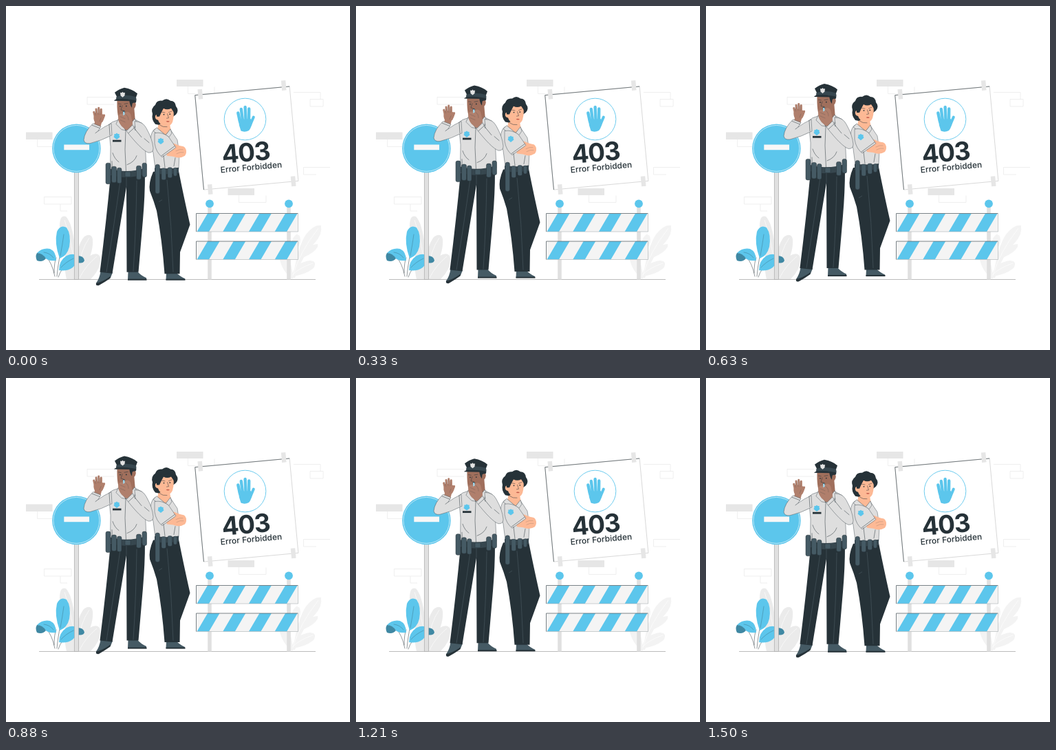
An HTML page that plays this animation: 500x500 px, repeating every 1540 ms.

```html
<!DOCTYPE html>
<html lang="en">
<head>
<meta charset="utf-8">
<title>403 Error Forbidden</title>
<style>
  html, body { margin: 0; width: 100%; height: 100%; overflow: hidden; background: #fff; }
  svg { display: block; width: 100%; height: 100%; }
  .blue { fill: #5cc6ec; }
  .deep { fill: #3f88a3; }
  .dark { fill: #263238; }
  .slate { fill: #37474f; }
  .steel { fill: #455a64; }
  .shirt { fill: #dedede; stroke: #3b474c; stroke-width: .45; }
  .brown { fill: #a06f5c; }
  .tan { fill: #b07f6c; }
  .peach { fill: #fdb995; }
  .grey { fill: #e6e6e6; }
  .leaf { fill: #ebebeb; }
  .pale { fill: #f3f3f3; }
  .line { fill: none; stroke: #263238; stroke-width: .5; stroke-linecap: round; }
  .seam { fill: none; stroke: #53636b; stroke-width: .5; }
  .vein { fill: none; stroke: #fff; stroke-width: .6; }
  .brick { fill: none; stroke: #e9e9e9; stroke-width: .7; }
  .finger { fill: none; stroke-linecap: round; }
  text { text-anchor: middle; fill: #263238; font-family: Inter, sans-serif; }
</style>
</head>
<body>
<svg viewBox="0 0 500 500">
  <defs>
    <clipPath id="board"><rect width="148" height="26.5"/></clipPath>
    <path id="star" d="M0 -4.6 1.6 -3.3 3.7 -3.2 3.6 -.8 4.5 1.1 2.8 2.7 0 4.8 -2.8 2.7 -4.5 1.1 -3.6 -.8 -3.7 -3.2 -1.6 -3.3Z"/>
  </defs>

  <!-- wall -->
  <path class="grey" d="M29 183.5h38.5v10.5H29ZM248 107h38.5v10H248ZM322.5 265H361v10h-38.5Z"/>
  <path class="brick" d="M157 132.5h-39v10.5h39M45.5 194v10.5H67M264.5 117v10.5H303v-10M418 125.5h39v10.5M461 135.5h-19v10.5h19ZM471 234.5h-38.5V245H451M95 277.5H55.5V288H95ZM79 288v10h10M338.5 275v10.5H378V275.5"/>

  <!-- pale plants -->
  <g class="leaf">
    <path d="M100 394Q79 360 78 320Q78 303 87 306Q101 320 103 394Z"/>
    <path d="M102 394Q100 350 114 335Q124 329 126 339Q128 362 106 394Z"/>
    <path d="M105 397Q110 367 126 361Q136 358 137 367Q138 382 123 397Z"/>
    <path d="M88 397Q82 372 93 370Q103 380 104 397Z"/>
  </g>
  <g class="pale">
    <path d="M417 395Q424 350 436 332Q448 317 458 319Q460 332 449 344Q432 360 420 395Z"/>
    <path d="M421 366Q432 348 453 346Q455 350 447 357Q434 367 421 368Z"/>
    <path d="M415 392Q421 372 442 370Q453 371 447 381Q435 391 415 393Z"/>
    <path d="M414 396Q398 380 397 362Q401 352 410 363Q416 377 417 396Z"/>
    <path d="M417 363Q411 340 422 332Q430 332 427 346Z"/>
  </g>
  <path class="vein" d="M417 392Q427 357 454 323M416 391Q427 380 446 374M101 392Q97 345 85 311M103 393Q108 355 121 337M107 395Q116 377 132 364"/>

  <path d="M48 397.5H450" stroke="#b4b4b4" stroke-width=".9"/>

  <!-- blue plant -->
  <path class="line" d="M71 393Q67 373 58 364M74 393Q76 368 83 345M76 394Q80 380 96 369M70 388Q70 372 73 366"/>
  <path class="blue" d="M78 367Q70 345 74 328Q79 317 88 322Q95 332 92 350Q89 363 78 367Z"/>
  <path class="blue" d="M73 370Q73 357 64 353Q53 351 45 359Q52 360 57 366Q60 371 73 370Z"/>
  <path class="deep" d="M45 359Q42 364 45 370Q53 373 58 367Q53 359 45 359Z"/>
  <path class="blue" d="M77 384Q77 370 88 363Q98 358 106 364L106 373Q101 375 97 380Q89 386 77 384Z"/>
  <path class="deep" d="M104 363Q113 363 114 370Q112 375 104 373Z"/>
  <path class="line" d="M79 363Q82 347 84 332M80 380Q87 372 98 367M69 366Q64 359 55 358" stroke-opacity=".5"/>

  <!-- no entry sign -->
  <rect x="99.3" y="240" width="6.2" height="157.5" fill="#e0e0e0" stroke="#a9a9a9" stroke-width=".7"/>
  <circle class="blue" cx="102.4" cy="206.9" r="35.3"/>
  <circle cx="102.4" cy="206.9" r="33.5" fill="none" stroke="#fff" stroke-width=".6"/>
  <rect x="84.3" y="201.5" width="36.7" height="7.7" fill="#f7f7f7"/>

  <!-- poster -->
  <g transform="translate(349.8 192) rotate(-5.3)">
    <rect x="-69" y="-69" width="138" height="138" fill="#fff" stroke="#b4b4b4" stroke-width=".5"/>
    <path d="M-69 69V-69H69" fill="none" stroke="#4a5358" stroke-width=".7"/>
    <path class="grey" d="M-64.5 -77h6.5v14.5h-6.5ZM57.5 -78.5h6.5v14.5h-6.5ZM-63 62h6.5v14.5H-63ZM58.5 61.5H65V76h-6.5Z"/>
  </g>
  <circle cx="347.5" cy="164.5" r="30.3" fill="#fff" stroke="#5cc6ec" stroke-width=".9"/>
  <g stroke="#5cc6ec">
    <path class="finger" stroke-width="4.4" d="M337.3 155.5 340 168M341.8 150 344.2 168M347.6 147 348.6 168M353.2 149.5 353 168"/>
    <path class="finger" stroke-width="4" d="M359.8 161.5 354.5 174"/>
  </g>
  <path class="blue" d="M337.6 165 355.5 164 358 169Q356 178 353 181Q347 184 341.5 181.5Q338.5 174 337.6 165Z"/>
  <text transform="translate(349.4 226) rotate(-5)" font-size="37" font-weight="700" letter-spacing="-1.5">403</text>
  <text transform="translate(356.7 238.5) rotate(-5)" font-size="12" font-weight="500">Error Forbidden</text>

  <!-- barrier -->
  <path d="M293.2 290h5.6v107.5h-5.6ZM408.2 290h5.6v107.5h-5.6Z" fill="#e0e0e0"/>
  <circle class="blue" cx="296" cy="287.3" r="5.9"/>
  <circle class="blue" cx="411" cy="287.3" r="5.9"/>
  <g id="boards"></g>

  <!-- officers -->
  <g id="crew">
    <g id="woman">
      <path class="steel" d="M233 387H247.5Q254 393 260 395.5V397.5H232.5Z"/>
      <path class="dark" d="M232.5 396H260.5V398H232.5Z"/>
      <path class="dark" d="M214 240Q207 256 209 268Q215 283 219 297Q227 340 230.5 388.5H252.5L253 357 267.5 317Q257 270 251 239Z"/>
      <path class="seam" d="M234 252Q241 320 243 386M222 284 227 281"/>
      <path class="peach" d="M221 168Q222 176 218 182L232 189 240 182 238 171Z"/>
      <path class="shirt" d="M219 177Q211 179 210 194Q210 203 214 213L217 236H251L252 214 249 194 239 179 232 187Z"/>
      <path class="dark" d="M217 171Q211 164 213 156Q210 148 217 143Q219 136 227 137Q233 132 239 137Q246 137 247 145Q252 151 247 157L243 160 222 172Z"/>
      <path class="peach" d="M220 154Q222 148 228 148Q237 148 243 147Q245 158 242 168Q239 175 232 174Q223 172 221 165Q216 164 217 159Q218 156 221 158Z"/>
      <path class="dark" d="M219 160Q217 148 224 146Q226 142 231 145Q236 141 241 145Q248 147 245 156Q243 152 240 148Q234 151 229 148Q226 153 223 160Z"/>
      <path class="line" stroke-width=".9" d="M226.5 153.5 231 154.2M236.5 154 241 152.3"/>
      <circle class="dark" cx="229.5" cy="157" r=".9"/>
      <circle class="dark" cx="238.3" cy="156.5" r=".9"/>
      <path class="line" d="M234.5 156 236.5 162 233.5 162.5M223 172Q228 176 234 175"/>
      <path d="M232.5 167Q235 165.5 238 167Q235.5 169 232.5 167Z" fill="#c45a4b"/>
      <path class="shirt" d="M219 176 214 181 227 191 232 187ZM239 178 232 187 237 190 241 184Z"/>
      <path class="peach" d="M244 199Q254 203 260 205Q264 211 260 217Q252 222 243 218L234 217 232 211Z"/>
      <path class="shirt" d="M216 184Q226 182 236 189L247 205 227 219Q218 212 216 199Z"/>
      <path class="peach" d="M246 206Q252 201 259 204Q264 210 260 216Q253 220 246 218Q240 214 246 206Z"/>
      <path class="line" d="M247 210Q252 207 257 208M248 214Q253 211 258 212" stroke-opacity=".35"/>
      <path class="line" d="M229 217 231 234M246 220 244 232M226 217 245 203"/>
      <use class="blue" href="#star" x="225" y="195.5"/>
      <path class="slate" d="M216 234.5Q235 237 251 234V242Q234 245 216 243Z"/>
      <g class="steel" stroke="#263238" stroke-width=".4">
        <rect x="217" y="229.5" width="6.5" height="42.5" rx="3"/>
        <rect x="226" y="235" width="6.5" height="17" rx="2"/>
        <rect x="235" y="234" width="6.5" height="15" rx="2"/>
        <rect x="243.5" y="234.5" width="5" height="12" rx="2"/>
      </g>
    </g>

    <g id="man">
      <path class="steel" d="M137.5 385 155 386.5 152 394Q143 400 135 405Q130 406.5 131 402Q136 395 137.5 385Z"/>
      <path class="dark" d="M131 402Q139 401 152 392L151.5 395Q143 401 135 405.3Q130.5 406.5 131 402Z"/>
      <path class="steel" d="M177.5 385H191Q196 391 204 394.5V397.5H177Z"/>
      <path class="dark" d="M177 396H204.5V398H177Z"/>
      <path class="dark" d="M152 245 202 243Q202 275 199 310L192.5 386H175.5L175 262 154.5 388 136.5 386Q146 310 152 245Z"/>
      <path class="seam" d="M166 254Q156 325 146 386M190 253Q189 325 185 385M175 248 175 262"/>
      <path class="brown" d="M164 158 163 168 174 181 188 168 186 144Z"/>
      <path class="shirt" d="M163 165Q154 167 149 172L152 204 151.5 239Q177 247 204 238L202 190 198 170 187 164 174 180Z"/>

      <!-- raised arm -->
      <path class="tan" d="M128.5 157Q129 152 134 155L142 157 144 158Q142 166 139 169L137 176 127.5 173 129 168Q126 162 128.5 157Z"/>
      <g stroke="#b07f6c">
        <path class="finger" stroke-width="3" d="M127.7 153.5 130 163M131 149.3 132.6 162M134.7 147.5 135.7 162M138.3 149.5 138.5 162"/>
        <path class="finger" stroke-width="2.7" d="M142.8 158 139 167"/>
      </g>
      <path class="line" stroke-opacity=".4" d="M129.5 152 130.5 158M133 149 134 157M136.7 150 137 157M138 162 136 167"/>
      <path class="shirt" d="M126.5 170 138 174.5 134 181Q142 175 153 170L154 187Q139 195 122 199Q114 200 113 194Q114 182 126.5 170Z"/>
      <path class="line" d="M125 172.5 136.5 177M134 181 130 184M150 172 151 187"/>

      <!-- head -->
      <path class="brown" d="M161.5 136H183Q189 137 188.5 143Q188 149 183.5 149Q183 160 178 165Q171 169 165 165Q161 158 161.5 136Z"/>
      <path class="dark" d="M179 135H189Q190 140 187.5 140Q183 140 183 147Q180 144 179 135Z"/>
      <path class="brown" d="M183.5 141Q188.5 138 188.5 143Q188 148.5 183.5 148Z"/>
      <path class="line" stroke-width="1" d="M163.5 141.3 167.3 142M172 141.7 177 140.8"/>
      <circle class="dark" cx="166" cy="145" r=".9"/>
      <circle class="dark" cx="174.8" cy="144.8" r=".9"/>
      <path class="line" d="M169 144 167 150.5 170 151"/>
      <path class="dark" d="M158 125Q164 120 172 118Q184 120 191 126.5L189 132Q190 135 189 137.5Q174 134 160 137L161 131Z"/>
      <path class="slate" d="M160.5 131Q174 127 189 131.5V136.5Q174 133 160 136.5Z"/>
      <path class="dark" d="M157 137Q159 134 165 134.5Q175 133 184 137.5Q170 137 157 137Z"/>
      <path d="M169.5 124 171 125.5 173 125 172.5 129.5 169.5 132 166.5 129.5 166 125 168 125.5Z" fill="#e3e3e3"/>

      <!-- collar and front -->
      <path class="shirt" d="M163 164 160 171 168 179 174 180ZM187 163 191 170 182 179 174 180Z"/>
      <path class="line" d="M174 180 173 208 174.5 240M176 230Q187 226 190 217M155 213Q158 222 164 226M153 238Q155 231 154 225"/>
      <use class="blue" href="#star" x="161" y="188.5"/>
      <rect class="dark" x="155" y="194" width="12.5" height="2.8"/>

      <!-- whistle hand and arm -->
      <path class="tan" d="M163.5 159Q165 155 169 156L176 153Q181 153 182 160L184 169 183 181 174 179 168 174Q162 167 163.5 159Z"/>
      <path class="line" stroke-opacity=".4" d="M166 160 173 163M166 165 173 168M174 157Q178 159 178 165"/>
      <circle class="dark" cx="171.3" cy="153" r="1.6"/>
      <path d="M170 153 172.3 152.5 172.7 157 170.3 158.5Z" fill="#9fd9ee"/>
      <path class="shirt" d="M187 167Q199 167 204 177Q213 193 214 206Q214 213 207 212.5Q197 209 175 181L184 172 188 180Z"/>
      <path class="line" d="M178 184 188 175M188 179 197 190M201 192 208 198"/>

      <!-- duty belt -->
      <path class="slate" d="M148 235Q176 244 204 234V242.5Q177 253 148 244Z"/>
      <g class="steel" stroke="#263238" stroke-width=".5">
        <rect x="145" y="227.5" width="7" height="30.5" rx="2.5"/>
        <rect x="153.5" y="232.5" width="7" height="23.5" rx="2.5"/>
        <rect x="161.5" y="234.5" width="6.5" height="22.5" rx="2.5"/>
        <rect x="189.5" y="231.5" width="7" height="20" rx="2.5"/>
        <rect x="198" y="227.5" width="6.5" height="20.5" rx="2.5"/>
        <rect x="173" y="240" width="8" height="7.5" rx="1"/>
      </g>
    </g>
  </g>
</svg>
<script>
  const stripes = [0, 1, 2, 3].map(i =>
    `<path class="blue" d="M${16.5 + i * 37.7} 0h17.5l-15.5 26.5h-17.5Z"/>`
  ).join('');
  document.getElementById('boards').innerHTML = [301.5, 342].map(y => `
    <g transform="translate(276.5 ${y})">
      <rect width="148" height="26.5" fill="#f4f4f4"/>
      <g clip-path="url(#board)">${stripes}</g>
      <path d="M0 26.5V0H148" fill="none" stroke="#5b666b" stroke-width=".8"/>
      <path d="M0 26.5H148V0" fill="none" stroke="#aab0b3" stroke-width=".6"/>
    </g>`).join('');

  // Both officers rise and sink together on a cosine, highest at PEAK ms.
  const LOOP = 1540, PEAK = 700, RISE = 6, REST = 0.8;
  const crew = document.getElementById('crew');
  const start = performance.now();
  function draw() {
    const phase = (performance.now() - start - PEAK) / LOOP * 2 * Math.PI;
    const y = REST - RISE / 2 * (1 + Math.cos(phase));
    crew.setAttribute('transform', `translate(0 ${y.toFixed(3)})`);
    requestAnimationFrame(draw);
  }
  draw();
</script>
</body>
</html>
```
